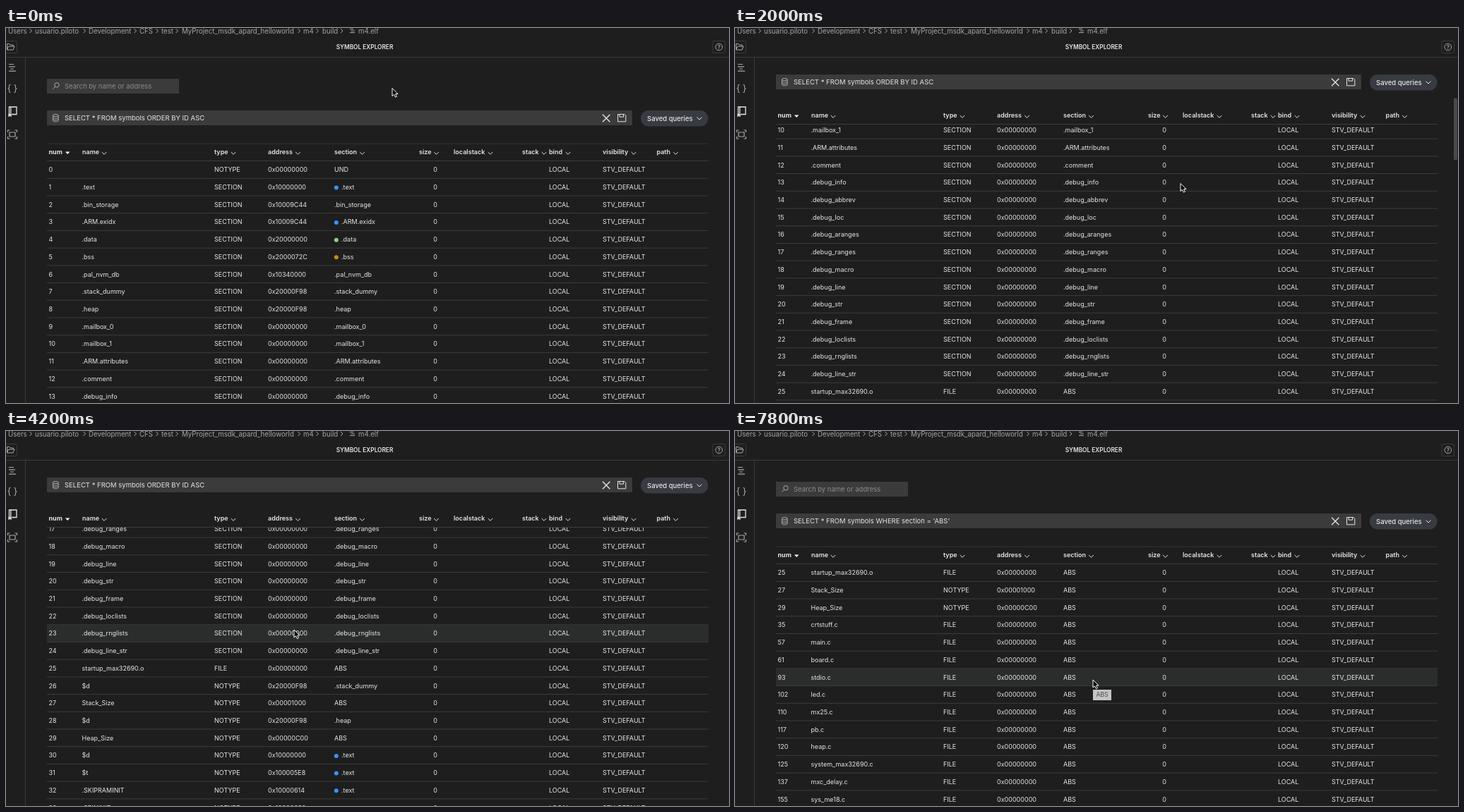
These frames come from a looping animation (1024 by 532 pixels, 8 s). An HTML page:

```html
<!DOCTYPE html>
<html lang="en">
<head>
<meta charset="utf-8">
<title>Symbol explorer</title>
<style>
  html, body { margin: 0; width: 100%; height: 100%; overflow: hidden; background: #1e1e1e; }
  svg { display: block; width: 1024px; height: 532px; font: 9px Inter, sans-serif; font-variant-ligatures: no-contextual; }
  text { fill: #e6e6e6; white-space: pre; }
  .bg { fill: #1e1e1e; }
  .line { stroke: #3b3b3b; fill: none; }
  .icon { stroke: #a8a8a8; fill: none; }
  .bright { stroke: #e6e6e6; fill: none; }
  .field { fill: #3b3b3b; }
  .head { font-weight: 600; }
  .crumb { font-size: 9.7px; fill: #a5a5a5; }
</style>
</head>
<body>
<svg viewBox="0 0 1024 532">
  <g id="allRows"></g>
  <g id="absRows"></g>

  <g id="header">
    <rect class="bg" x="50" y="163.5" width="960" height="25"/>
    <path class="line" d="M58 188.5H995"/>
    <path d="M84 175.5h6.4l-3.2 3.6z" fill="#fff"/>
  </g>

  <g id="intro">
    <path class="line" d="M58 164H995"/>
    <rect class="field" x="58" y="72" width="187" height="21"/>
    <g class="icon"><circle cx="72" cy="80.8" r="3.2"/><path d="M69.7 83.1L66.3 86.5"/></g>
    <text x="83" y="86.2" font-size="9.5" style="fill:#8b8b8b">Search by name or address</text>
  </g>

  <g id="query">
    <rect class="bg" x="50" y="93" width="960" height="70.5"/>
    <rect class="field" x="58" y="117" width="829" height="21"/>
    <g class="icon">
      <ellipse cx="70.3" cy="124" rx="3.8" ry="1.6"/>
      <path d="M66.5 124v7.2c0 2.2 7.6 2.2 7.6 0V124M66.5 126.5c0 2.2 7.6 2.2 7.6 0M66.5 129c0 2.2 7.6 2.2 7.6 0"/>
    </g>
    <text id="sql" x="83" y="131.2" font-size="9.5"></text>
    <path class="bright" stroke-width="1.3" d="M845 122.8l10.4 10.4M855.4 122.8l-10.4 10.4"/>
    <path class="bright" d="M866.5 122.5h9.5l1.8 1.8v8.5h-11.3zM869 122.5v3.6h5.6v-3.6"/>
    <rect x="899" y="117" width="95.5" height="22.5" rx="11.2" fill="#383b42"/>
    <text x="908" y="131.5" font-size="9.5" font-weight="500">Saved queries</text>
    <path class="bright" d="M978.5 126.5l3.5 3.5 3.5-3.5"/>
  </g>

  <g id="toolbar">
    <rect class="bg" width="1024" height="42"/>
    <path class="line" d="M0 41.5H1024M27.5 42V532"/>
    <text x="508" y="30" font-size="8.3" font-weight="600" text-anchor="middle">SYMBOL EXPLORER</text>
    <rect class="line" x="-3.5" y="18.5" width="19" height="17" rx="2"/>
    <path class="icon" d="M1.5 31V22.5h3.5l1.2 1.5h4v2M1.5 31l2-5h8.500l-2 5z"/>
    <rect class="line" x="1001" y="18.5" width="17.5" height="17" rx="2"/>
    <circle class="icon" cx="1009.8" cy="27" r="4.8"/>
    <text x="1009.8" y="29.8" font-size="7.5" text-anchor="middle">?</text>
    <path class="icon" d="M487 1.5h5M488.5 4h5.5M487 6.5h7"/>
  </g>

  <path class="icon" stroke-width="1.2" d="M4 51.5h7M4 54.8h9M6 58h5M4 61.2h10"/>
  <text x="9" y="90.3" font-size="13" text-anchor="middle" style="fill:#a8a8a8">{ }</text>
  <path class="bright" stroke-width="1.3" d="M4.500 122.500V112h10.500v10.500H8M6.800 112v9.500M4 122.500v2.500l1.500-1 1.500 1v-2.500z"/>
  <path class="icon" stroke-width="1.2" d="M2.5 148v-3h3M12.5 145h3v3M15.5 154v3h-3M5.5 157h-3v-3M5 148h8v6h-8z"/>

  <rect id="thumb" x="1018" width="5" height="88" rx="2" fill="#4a4a4a"/>

  <g id="menu">
    <rect x="472" y="339" width="165" height="30" fill="#1f1f1f" style="filter:drop-shadow(0 1px 3px #0006)"/>
    <rect id="menuItem" x="472" y="344" width="165" height="20" fill="#04395e"/>
    <text x="496.5" y="357.3" font-size="9.4">Filter by section 'ABS'</text>
  </g>
  <g id="tooltip">
    <rect x="507" y="367" width="26" height="15" fill="#c4c4c4"/>
    <text x="520" y="377.4" font-size="8.5" text-anchor="middle" style="fill:#4a4a4a">ABS</text>
  </g>
  <path id="arrow" d="M0 0V11L2.6 8.7 4.4 12.6 6.4 11.7 4.7 8H8Z" fill="#000" stroke="#fff"/>
  <path id="hand" d="M-1.2 7V.8a1.2 1.2 0 0 1 2.4 0V4.5l4 .8q1.3.4 1.2 1.8l-.6 3-1 2.4H0L-3.6 7.6q.6-1.4 2.4 0z" fill="#fff" stroke="#111" stroke-width=".8"/>
</svg>

<script>
const $ = id => document.getElementById(id);
const LOOP = 8000, STEP = 100, PITCH = 24.71, FIRST_ROW = 188.6;

const label = (x, y, str, attrs = '') => `<text x="${x}" y="${y}" ${attrs}>${str}</text>`;
const add = (id, markup) => $(id).insertAdjacentHTML('beforeend', markup);

// Breadcrumb
const crumbs = [[3, 'Users'], [41, 'usuario.piloto'], [117, 'Development'], [189, 'CFS'], [220, 'test'],
  [249, 'MyProject_msdk_apard_helloworld'], [421, 'm4'], [448, 'build'], [499, 'm4.elf']];
add('toolbar', crumbs.map(([x, str]) => label(x, 7.6, str, 'class="crumb"')).join(''));
add('toolbar', [33.5, 109.5, 181.5, 212.5, 240.5, 413.5, 439.5, 474].map(x =>
  `<path class="icon" d="M${x} 1l3 3-3 3"/>`).join(''));

// Column heads: text x, title, chevron centre
const columns = [[108, 'name', 139], [295, 'type', 322], [371, 'address', 413.5], [465, 'section', 504.5],
  [585, 'size', 609.5], [634, 'localstack', 686], [731, 'stack', 762], [769, 'bind', 796],
  [845, 'visibility', 889], [921.5, 'path', 948.5]];
add('header', label(60.5, 179.2, 'num', 'font-weight="700"') + columns.map(([x, title, chevron]) =>
  label(x, 179.2, title, 'class="head"') +
  `<path class="bright" d="M${chevron - 3.3} 176l3.3 3.3 3.3-3.3"/>`).join(''));

// Table rows
const dots = { '.text': '#3794ff', '.ARM.exidx': '#3794ff', '.data': '#89d185', '.bss': '#ca8a1e' };

function rowMarkup([num, name, type, address, section], i) {
  const top = FIRST_ROW + i * PITCH, base = top + 15.7, dot = dots[section];
  return `<rect class="hover" x="58" y="${top}" width="937" height="${PITCH}" fill="#2b2d2d" visibility="hidden"/>` +
    (num === 25 ? `<rect class="cell" x="462" y="${top}" width="76" height="${PITCH}" fill="#04395e" visibility="hidden"/>` : '') +
    `<path class="line" d="M58 ${top + PITCH}H995"/>` +
    (dot ? `<circle cx="467.8" cy="${top + 13.2}" r="3" fill="${dot}"/>` : '') +
    label(60.5, base, num) + label(107.5, base, name) + label(295, base, type) +
    label(371, base, '0x' + address.padStart(8, '0')) + label(dot ? 475 : 465, base, section) +
    label(611, base, 0, 'text-anchor="end"') + label(769, base, 'LOCAL') + label(845, base, 'STV_DEFAULT');
}

const sections = `.text 10000000,.bin_storage 10009C44,.ARM.exidx 10009C44,.data 20000000,.bss 2000072C,
.pal_nvm_db 10340000,.stack_dummy 20000F98,.heap 20000F98,.mailbox_0,.mailbox_1,.ARM.attributes,.comment,
.debug_info,.debug_abbrev,.debug_loc,.debug_aranges,.debug_ranges,.debug_macro,.debug_line,.debug_str,
.debug_frame,.debug_loclists,.debug_rnglists,.debug_line_str`.split(/,\s*/);
const symbols = `$d 20000F98 .stack_dummy,Stack_Size 1000 ABS,$d 20000F98 .heap,Heap_Size C00 ABS,
$d 10000000 .text,$t 100005E8 .text,.SKIPRAMINIT 10000614 .text,.SPININIT 10000620 .text`.split(/,\s*/);
const files = `25 startup_max32690.o,27 Stack_Size 1000,29 Heap_Size C00,35 crtstuff.c,57 main.c,61 board.c,
93 stdio.c,102 led.c,110 mx25.c,117 pb.c,120 heap.c,125 system_max32690.c,137 mxc_delay.c,155 sys_me18.c`.split(/,\s*/);

const allRows = [
  [0, '', 'NOTYPE', '', 'UND'],
  ...sections.map((entry, i) => {
    const [name, address = ''] = entry.split(' ');
    return [i + 1, name, 'SECTION', address, name];
  }),
  [25, 'startup_max32690.o', 'FILE', '', 'ABS'],
  ...symbols.map((entry, i) => {
    const [name, address, section] = entry.split(' ');
    return [i + 26, name, 'NOTYPE', address, section];
  })
];
const absRows = files.map(entry => {
  const [num, name, address = ''] = entry.split(' ');
  return [num, name, address ? 'NOTYPE' : 'FILE', address, 'ABS'];
});
add('allRows', allRows.map(rowMarkup).join(''));
add('absRows', absRows.map(rowMarkup).join(''));
const hovers = { all: [...$('allRows').querySelectorAll('.hover')], abs: [...$('absRows').querySelectorAll('.hover')] };
const cell = $('allRows').querySelector('.cell');

// Motion keys: time, then values
const scrollKeys = [[800, 0], [900, 1.5], [1000, 22], [1100, 57.5], [1300, 145], [1500, 210], [1700, 256],
  [1800, 274], [2000, 303.2], [2200, 320], [2600, 332], [2700, 333], [2800, 348], [3100, 445.4],
  [3200, 461], [3400, 477], [3600, 482.2]];
const cursorKeys = [[0, 547, 85.5], [400, 597, 160], [800, 631, 220.5], [2700, 631, 220.5], [3100, 629.5, 221.5],
  [3600, 629.5, 221.5], [4200, 408, 282], [4400, 445, 490], [4500, 460, 470], [5200, 471, 338],
  [5500, 472, 339], [5700, 501, 350.5], [5900, 507, 353]];

function at(keys, t) {
  const next = keys.findIndex(key => key[0] > t);
  if (next === 0) return keys[0].slice(1);
  if (next < 0) return keys.at(-1).slice(1);
  const a = keys[next - 1], b = keys[next], k = (t - a[0]) / (b[0] - a[0]);
  return a.slice(1).map((v, i) => v + (b[i + 1] - v) * k);
}

const show = (el, on) => el.setAttribute('visibility', on ? 'visible' : 'hidden');
const move = (id, x, y) => $(id).setAttribute('transform', `translate(${x} ${y})`);

function draw(t) {
  const filtered = t >= 6100;
  const scroll = filtered ? 0 : at(scrollKeys, t)[0];
  const [x, y] = at(cursorKeys, t);

  move('allRows', 0, -scroll);
  move('intro', 0, -scroll);
  move('header', 0, -Math.min(scroll, 52));
  move('query', 0, -Math.min(scroll, 51));
  $('allRows').style.display = filtered ? 'none' : '';
  $('absRows').style.display = filtered ? '' : 'none';
  $('sql').textContent = 'SELECT * FROM symbols ' + (filtered ? "WHERE section = 'ABS'" : 'ORDER BY ID ASC');

  // The hovered row stays put while the wheel scrolls
  const under = Math.floor((y + scroll - FIRST_ROW) / PITCH);
  const hovered = t >= 900 && t < 3700 ? 1 : t >= 5400 && t < 6300 ? -1 : under;
  hovers.all.forEach((el, i) => show(el, !filtered && i === hovered));
  hovers.abs.forEach((el, i) => show(el, filtered && i === hovered));

  const menuOpen = t >= 5400 && t < 5900;
  $('menu').style.display = menuOpen ? '' : 'none';
  show(cell, menuOpen);
  show($('menuItem'), menuOpen && t >= 5600);
  show($('tooltip'), t >= 7800);

  $('thumb').setAttribute('y', 43.3 + scroll * .1856);
  $('thumb').setAttribute('opacity', t < 900 ? 0 : Math.max(0, Math.min(1, (4100 - t) / 300)));

  const pointing = t >= 5600 && t < 6600;
  show($('hand'), pointing);
  show($('arrow'), !pointing);
  move('hand', x, y);
  move('arrow', x, y);
}

function tick() {
  const t = performance.now() % LOOP;
  draw(Math.floor(t / STEP) * STEP);
  requestAnimationFrame(tick);
}
tick();
</script>
</body>
</html>
```
